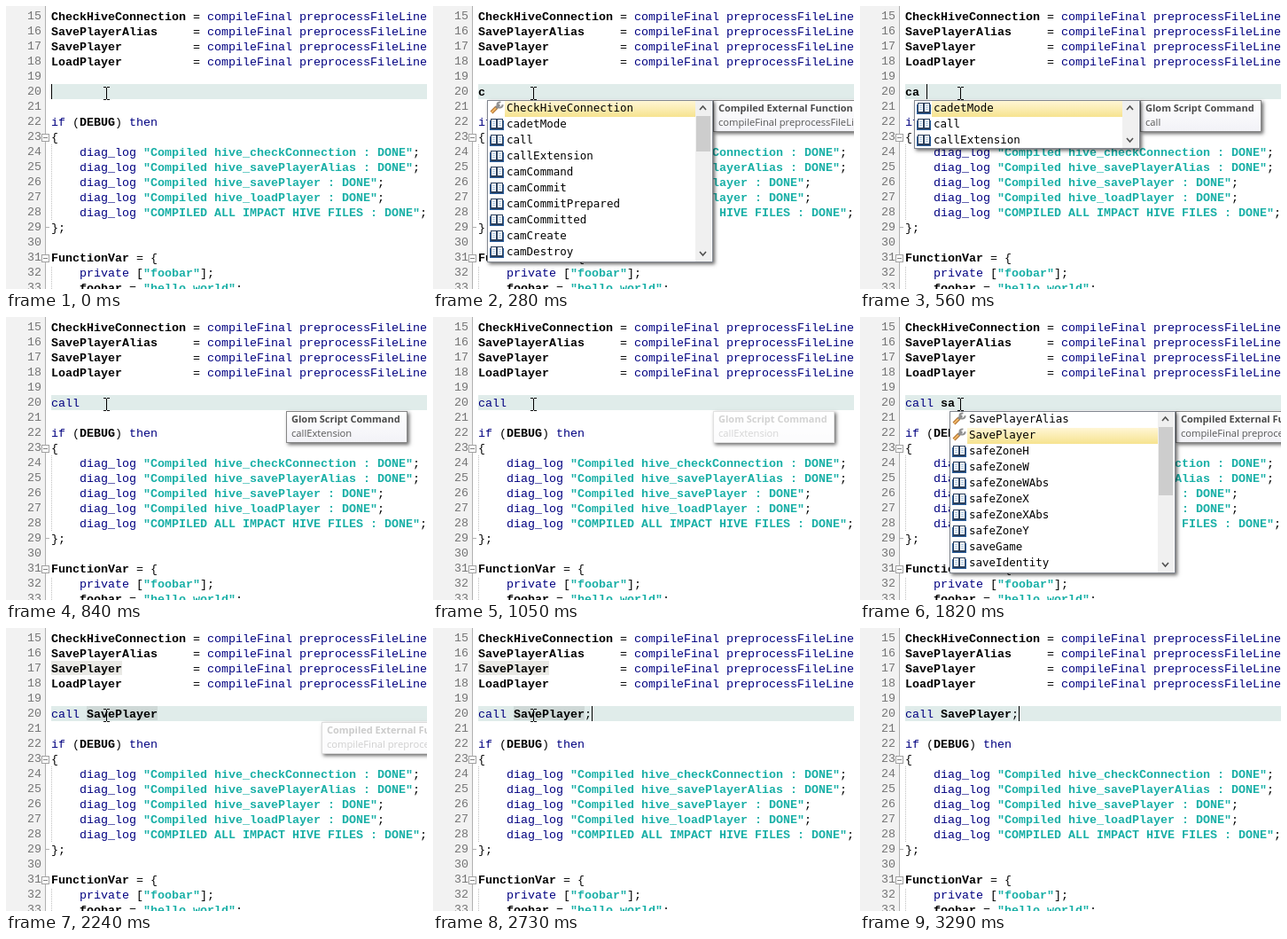
An HTML page with a canvas for the animation above (3.57 s loop, 475x319 px).

```html
<!DOCTYPE html>
<html lang="en">
<head>
<meta charset="utf-8">
<title>Editor autocompletion</title>
<style>
  html, body { margin: 0; width: 100%; height: 100%; overflow: hidden; background: #fff; }
  canvas { display: block; }
</style>
</head>
<body>
<canvas width="475" height="319"></canvas>
<script>
const ctx = document.querySelector('canvas').getContext('2d');
const LOOP = 3570, TICK = 70;
const CELL = 8, ROW = 17, LEFT = 51, FIRST = 15;
const CODE = '13.333px "Liberation Mono", monospace';
const LIST = '12.5px "DejaVu Sans Mono", monospace';
const TIP = '"Open Sans", sans-serif';
const KEYWORDS = new Set(['compileFinal', 'preprocessFileLineNumbers', 'if', 'then', 'diag_log', 'private', 'call']);

const load = name => name.padEnd(20) + '= compileFinal preprocessFileLineNumbers';
const log = text => `    diag_log "${text} : DONE";`;
const source = [
  load('CheckHiveConnection'), load('SavePlayerAlias'), load('SavePlayer'), load('LoadPlayer'),
  '', '', '', 'if (DEBUG) then', '{',
  log('Compiled hive_checkConnection'), log('Compiled hive_savePlayerAlias'),
  log('Compiled hive_savePlayer'), log('Compiled hive_loadPlayer'),
  log('COMPILED ALL IMPACT HIVE FILES'),
  '};', '', 'FunctionVar = {', '    private ["foobar"];', '    foobar = "hello world";'
];

const camItems = ['cadetMode', 'call', 'callExtension', 'camCommand', 'camCommit',
  'camCommitPrepared', 'camCommitted', 'camCreate', 'camDestroy', 'camPreload'];
const saveItems = ['SavePlayerAlias', 'SavePlayer', 'safeZoneH', 'safeZoneW', 'safeZoneWAbs',
  'safeZoneX', 'safeZoneXAbs', 'safeZoneY', 'saveGame', 'saveIdentity'];

// What stands on line 20, from each time on.
const typing = [[0, ''], [280, 'c'], [350, 'ca'], [490, 'ca '], [630, 'cal'], [700, 'call'],
  [1190, 'call s'], [1330, 'call sa'], [2100, 'call SavePlayer'], [2730, 'call SavePlayer;']];

const rowTop = n => 3 + (n - FIRST) * ROW;
const within = (t, from, to) => t >= from && t < to;

function rect(x, y, w, h, color) {
  ctx.fillStyle = color;
  ctx.fillRect(x, y, w, h);
}

function line(points, color, width = 1) {
  ctx.beginPath();
  points.forEach(([x, y]) => ctx.lineTo(x, y));
  ctx.strokeStyle = color;
  ctx.lineWidth = width;
  ctx.stroke();
}

function text(string, x, y, font, color) {
  ctx.font = font;
  ctx.fillStyle = color;
  ctx.fillText(string, x, y);
}

function vertical(top, bottom, from, to) {
  const shade = ctx.createLinearGradient(0, top, 0, bottom);
  shade.addColorStop(0, from);
  shade.addColorStop(1, to);
  return shade;
}

function panel(x, y, w, h, fill, border) {
  ctx.save();
  ctx.shadowColor = 'rgba(0,0,0,.6)';
  ctx.shadowBlur = 4;
  ctx.shadowOffsetX = ctx.shadowOffsetY = 2;
  rect(x, y, w, h, border);
  ctx.restore();
  rect(x + 1, y + 1, w - 2, h - 2, fill);
}

function codeLine(string, n) {
  for (const { 0: token, index } of string.matchAll(/"[^"]*"|\w+|[^\s\w"]/g)) {
    const word = /^\w/.test(token), quoted = token[0] === '"', key = KEYWORDS.has(token);
    const bold = quoted || (word && !key);
    const color = quoted ? '#18afa6' : key ? '#000080' : '#000';
    text(token, LEFT + index * CELL, rowTop(n) + 13, (bold ? 'bold ' : '') + CODE, color);
  }
}

function foldBox(n) {
  const y = rowTop(n) + 5;
  rect(40, y, 9, 9, '#a0a0a0');
  rect(41, y + 1, 7, 7, '#fff');
  rect(42, y + 4, 5, 1, '#808080');
}

function drawEditor(typed, marked) {
  rect(0, 0, 475, 319, '#fff');
  rect(0, 0, 44, 319, '#f2f2f2');
  rect(44, 0, 1, 319, '#b0b0b0');
  rect(LEFT, rowTop(20), 424, ROW, '#e0ecea');
  if (marked) {
    rect(LEFT, rowTop(17), 80, 16, '#e9e9e5');
    rect(LEFT + 40, rowTop(20), 80, 16, '#cfd9d7');
  }
  rect(44, 249, 5, 1, '#b0b0b0');
  foldBox(23);
  foldBox(31);
  for (let y = rowTop(24); y < 319; y += 2)
    if (y < rowTop(29) || y > rowTop(32)) rect(LEFT, y, 1, 1, '#c0c0c0');
  source.forEach((string, i) => {
    const n = FIRST + i;
    text(n, 24, rowTop(n) + 12, CODE, '#757575');
    codeLine(n === 20 ? typed : string, n);
  });
}

function bookIcon(x, y) {
  rect(x, y + 4, 16, 11, '#2b5f9e');
  for (const side of [1, 8]) {
    rect(x + side, y + 2, 7, 12, '#2a3f5c');
    rect(x + side + 1, y + 3, 5, 9, '#fff');
    for (let i = 0; i < 3; i++) rect(x + side + 2, y + 5 + i * 2, 3, 1, '#a9c4de');
  }
}

function wrenchIcon(x, y) {
  line([[x + 2, y + 13], [x + 8, y + 7]], '#b06f2c', 4);
  line([[x + 2, y + 13], [x + 8, y + 7]], '#efb86a', 2);
  line([[x + 7, y + 8], [x + 11, y + 4]], '#8a8a8a', 3);
  ctx.beginPath();
  ctx.arc(x + 11.5, y + 4.5, 3, -.1, Math.PI * 1.6);
  ctx.strokeStyle = '#929292';
  ctx.lineWidth = 2;
  ctx.stroke();
}

function chevron(x, y, dir) {
  line([[x - 3.5, y + 2 * dir], [x, y - 2 * dir], [x + 3.5, y + 2 * dir]], '#505050', 1.6);
}

function drawList({ x, items, selected, thumb = 0 }) {
  const top = 106, height = items.length * 18 + (items.length > 3 ? 3 : 1);
  panel(x, top, 255, height, '#fff', '#828790');
  rect(x + 235, top + 1, 18, height - 2, '#f0f0f0');
  rect(x + 236, top + 18, 16, thumb, '#cdcdcd');
  chevron(x + 243.5, top + 9, 1);
  chevron(x + 243.5, top + height - 10, -1);
  items.forEach((item, i) => {
    const y = top + 1 + i * 18;
    if (i === selected) rect(x + 20, y, 215, 18, vertical(y, y + 18, '#fff6d5', '#f6e38f'));
    (/^[A-Z]/.test(item) ? wrenchIcon : bookIcon)(x + 3, y);
    text(item, x + 22, y + 12, LIST, '#000');
  });
}

// A fading tip turns white while its shadow stays.
function drawTip({ x, width, title, body }, alpha = 1) {
  const y = 106, height = 36;
  panel(x, y, width, height, vertical(y, y + height, '#fff', '#f2f2f7'), '#868686');
  text(title, x + 6, y + 13, `bold 11px ${TIP}`, '#4c4c4c');
  text(body, x + 6, y + 29, `11.2px ${TIP}`, '#575757');
  rect(x, y, width, height, `rgba(255,255,255,${1 - alpha})`);
}

const commandTip = body => ({ x: 316, width: 137, title: 'Glom Script Command', body });
const functionTip = x => ({ x, width: 260, title: 'Compiled External Function',
  body: 'compileFinal preprocessFileLineNumbers' });

function drawCompletion(t) {
  const fade = start => 1 - (t - start) / 280;
  if (within(t, 280, 350)) {
    drawTip(functionTip(316));
    drawList({ x: 61, items: ['CheckHiveConnection', ...camItems.slice(0, 9)], selected: 0, thumb: 40 });
  } else if (within(t, 350, 490)) {
    drawTip(commandTip('cadetMode'));
    drawList({ x: 61, items: camItems, selected: 0, thumb: 76 });
  } else if (within(t, 490, 840)) {
    drawTip(commandTip(t < 630 ? 'call' : 'callExtension'));
    drawList({ x: 61, items: camItems.slice(0, 3), selected: t < 630 ? 0 : 1 });
  } else if (within(t, 840, 1120)) {
    drawTip(commandTip('callExtension'), fade(840));
  } else if (within(t, 1190, 2100)) {
    drawTip(functionTip(356));
    drawList({ x: 101, items: saveItems, selected: t < 1820 ? 0 : 1, thumb: t < 1330 ? 30 : 77 });
  } else if (within(t, 2100, 2320)) {
    drawTip(functionTip(356), fade(2040));
  }
}

function drawPointer(x) {
  rect(x, 92, 1, 13, '#000');
  for (const y of [91, 105]) {
    rect(x - 3, y, 3, 1, '#000');
    rect(x + 1, y, 3, 1, '#000');
  }
}

const caretShown = t => t < 280 || within(t, 490, 630) || within(t, 1890, 2100)
  || within(t, 2730, 2800) || t >= 3290;

function draw(t) {
  const typed = typing.findLast(([start]) => t >= start)[1];
  drawEditor(typed, within(t, 2100, 2800));
  if (caretShown(t)) rect(LEFT + typed.length * CELL, rowTop(20), 1, ROW, '#000');
  drawCompletion(t);
  if (t < 3150) drawPointer(t < 3080 ? 113 : 134);
}

function frame() {
  const t = performance.now() % LOOP;
  draw(Math.floor(t / TICK) * TICK);
  requestAnimationFrame(frame);
}
frame();
</script>
</body>
</html>
```
